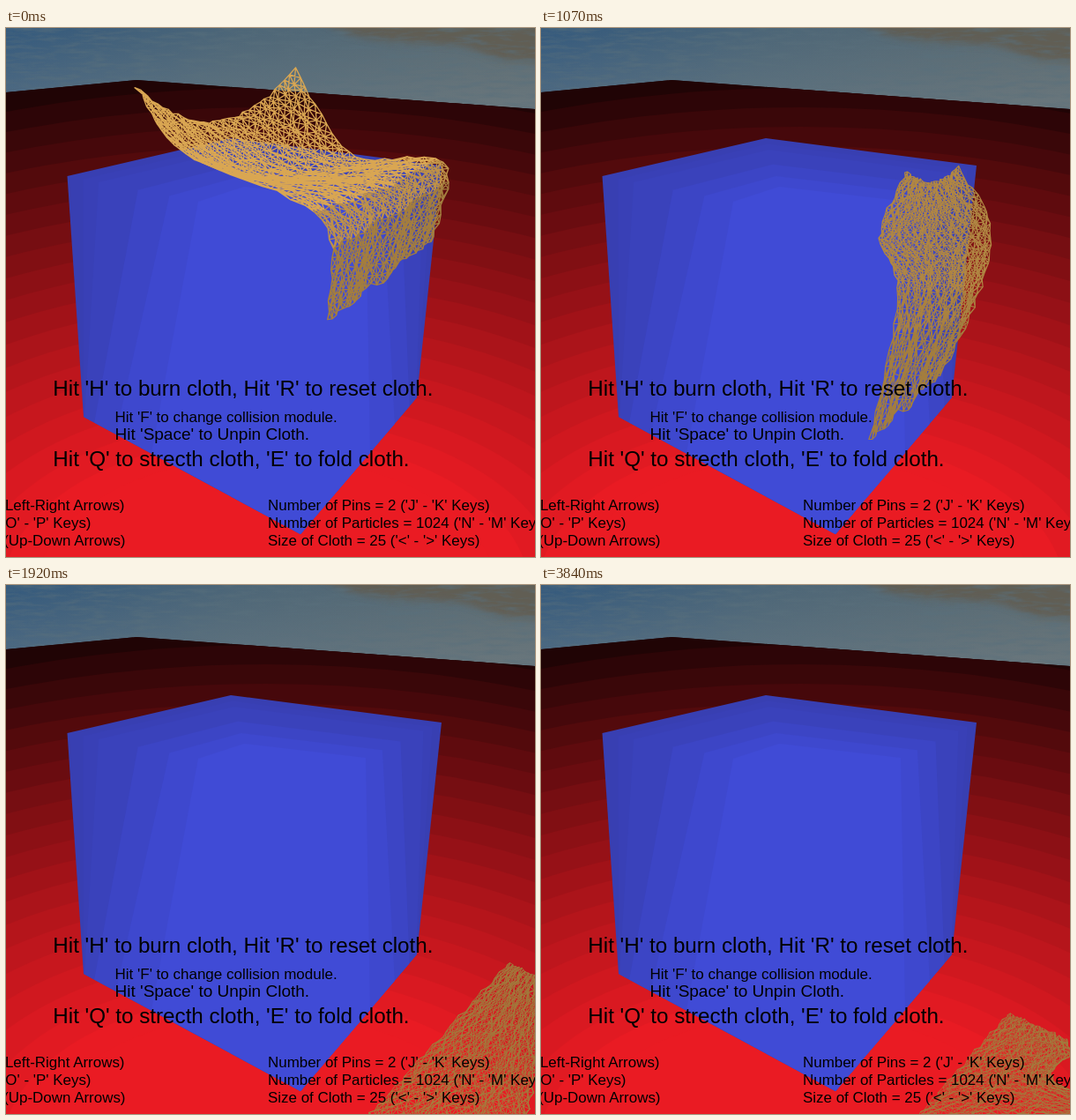
These frames come from a looping animation (600x600 px, 3920 ms). An HTML page:

```html
<!DOCTYPE html>
<html lang="en">
<head>
<meta charset="utf-8">
<title>Cloth over a box</title>
<style>
  html, body { margin: 0; width: 100%; height: 100%; overflow: hidden; background: #000; }
  svg { display: block; width: 100vw; height: 100vh; }
  text { font-family: "Liberation Sans", Arial, sans-serif; fill: #000; white-space: pre; }
</style>
</head>
<body>
<svg id="stage" viewBox="0 0 600 600">
  <defs>
    <linearGradient id="sky" x1="0" y1="0" x2="1" y2="0.12">
      <stop offset="0" stop-color="#33597d"/>
      <stop offset="0.45" stop-color="#4d6677"/>
      <stop offset="1" stop-color="#5d6c72"/>
    </linearGradient>
    <linearGradient id="haze" x1="0" y1="0" x2="0" y2="1">
      <stop offset="0" stop-color="#7d888e" stop-opacity="0"/>
      <stop offset="1" stop-color="#7d888e" stop-opacity="0.4"/>
    </linearGradient>
    <filter id="soft" x="-20%" y="-40%" width="140%" height="180%"><feGaussianBlur stdDeviation="4"/></filter>
    <filter id="grain" x="0" y="0" width="100%" height="100%">
      <feTurbulence type="fractalNoise" baseFrequency="0.035 0.2" numOctaves="5" seed="8"/>
      <feColorMatrix values="0 0 0 0 0.1  0 0 0 0 0.16  0 0 0 0 0.2  2.4 0 0 0 -1"/>
    </filter>
    <clipPath id="ground"><path d="M0 73 148 59 600 92V600H0Z"/></clipPath>
  </defs>
  <rect width="600" height="100" fill="url(#sky)"/>
  <rect width="600" height="100" fill="url(#haze)"/>
  <path d="M335-20H620V40L560 36 520 20 440 16 390 8Z" fill="#625b4f" opacity="0.85" filter="url(#soft)"/>
  <rect width="600" height="100" filter="url(#grain)" opacity="0.6"/>
  <g id="floor" clip-path="url(#ground)"></g>
  <g id="box"></g>
  <g id="cloth" fill="none" stroke-linejoin="round"></g>
  <g id="labels"></g>
</svg>
<script>
const LOOP = 3920, STEP = 76.9, N = 32, BANDS = 8;
const byId = id => document.getElementById(id);
const lerp = (a, b, p) => a + (b - a) * p;
const clamp = (x, a, b) => Math.min(b, Math.max(a, x));
const mix = (a, b, p) => a.map((x, i) => lerp(x, b[i], p));
const rgb = c => `rgb(${c.map(Math.round)})`;

function add(parent, tag, attrs, text = "") {
  const el = document.createElementNS("http://www.w3.org/2000/svg", tag);
  for (const k in attrs) el.setAttribute(k, attrs[k]);
  el.textContent = text;
  return byId(parent).appendChild(el);
}

// Floor: rings of light that brighten towards the viewer
add("floor", "rect", { width: 600, height: 600, fill: "#1e0203" });
for (let top = 46; top < 490; top += 22) {
  const q = Math.min(1, (top - 46) / 420), r = 32 + 202 * q * (1.25 - 0.25 * q), ry = 640 - top;
  add("floor", "ellipse", { cx: 295, cy: 640, rx: ry * 1.7, ry, fill: rgb([r, r * 0.115, r * 0.15]) });
}

// Box: shades nested from the silhouette to the bright middle
const boxTop = [69.5,168, 255,125, 494,156], lightTop = [218,197, 270,180, 408,196];
const boxBase = [466,419, 334,574, 88,441], lightBase = [413,482, 334,574, 165,482];
for (const p of [0, 0.12, 0.24, 0.54, 0.78, 1])
  add("box", "polygon", {
    points: [...mix(boxTop, lightTop, p), ...mix(boxBase, lightBase, p ** 3)].join(" "),
    fill: rgb(mix([56, 63, 178], [64, 75, 214], p))
  });

// Labels
const label = (x, y, size, text, anchor = "start") =>
  add("labels", "text", { x, y, "font-size": size, "text-anchor": anchor }, text);
label(53.3, 417, 24.2, "Hit 'H' to burn cloth, Hit 'R' to reset cloth.");
label(123.5, 447, 17, "Hit 'F' to change collision module.");
label(123.5, 467, 19, "Hit 'Space' to Unpin Cloth.");
label(53.3, 497, 24.2, "Hit 'Q' to strecth cloth, 'E' to fold cloth.");
["Number of Pins = 2 ('J' - 'K' Keys)",
  "Number of Particles = 1024 ('N' - 'M' Keys)",
  "Size of Cloth = 25 ('<' - '>' Keys)"].forEach((s, i) => label(297, 547 + 20 * i, 16.95, s));
label(134.5, 547, 16.95, "(Left-Right Arrows)", "end");
label(96.5, 567, 16.95, "('O' - 'P' Keys)", "end");
label(135.5, 587, 16.95, "(Up-Down Arrows)", "end");

// Cloth: a net hung between two side curves, sagging along its upper hem
let seed = 7;
const random = () => (seed = seed * 16807 % 2147483647) / 2147483647;
const jitter = Array.from({ length: N * N }, () => [random() - 0.5, random() - 0.5]);

function spline(points, t) {
  const last = points.length - 1, i = Math.min(last - 1, Math.floor(t * last)), f = t * last - i;
  const b = points[i], c = points[i + 1];
  const a = points[i - 1] || mix(c, b, 2), d = points[i + 2] || mix(b, c, 2);
  return b.map((_, k) => b[k] + f / 2 * (c[k] - a[k]
    + f * (2 * a[k] - 5 * b[k] + 4 * c[k] - d[k] + f * (3 * (b[k] - c[k]) + d[k] - a[k]))));
}

// ease > 1 slows down towards the next pose; shade is the light on upper and lower part
function pose({ left, right, sag = 0, notch = 0, rough = 4, ...look }) {
  const mesh = jitter.map(([jx, jy], i) => {
    const u = i % N / (N - 1), v = Math.floor(i / N) / (N - 1);
    const [x, y] = mix(spline(left, v), spline(right, v), u);
    const fold = Math.sin(u * 19 + v * 4) * v * Math.sin(u * Math.PI);
    const dip = sag * 4 * u * (1 - u) * (1 - v) ** 2;
    const tuck = notch * u * u * Math.sin(v * Math.PI) ** 4;
    return [x + rough * (jx + fold) - tuck, y + rough * (jy + 0.6 * fold) + dip];
  });
  return { ease: 1, ...look, mesh };
}

const poses = [
  pose({ time: 0, ease: 0.8, sag: 50, width: 1.3, shade: [1, 0.75],
    left: [[148,66], [202,142], [356,215], [366,332]],
    right: [[328,46], [392,144], [496,151], [486,238]] }),
  pose({ time: 770, ease: 0.85, sag: 28, width: 1.2, shade: [0.93, 0.76],
    left: [[287,140], [284,188], [374,216], [370,412]],
    right: [[373,113], [480,157], [500,228], [484,318]] }),
  pose({ time: 1380, width: 1, shade: [0.66, 0.74],
    left: [[572,190], [476,350], [377,537]],
    right: [[597,212], [520,358], [420,480]] }),
  pose({ time: 1920, ease: 4, width: 0.9, shade: [0.74, 0.76],
    left: [[572,427], [412,600]], right: [[625,455], [580,650]] }),
  pose({ time: 2690, width: 0.7, shade: [0.76, 0.76],
    left: [[464,560], [442,604]], right: [[520,575], [548,606]] }),
  pose({ time: 3460, notch: 34, width: 0.7, shade: [0.75, 0.75],
    left: [[521,510], [418,606]], right: [[582,545], [622,605]] }),
  pose({ time: 3840, notch: 34, width: 0.7, shade: [0.75, 0.75],
    left: [[531,486], [424,605]], right: [[596,516], [630,600]] })
];

const strips = Array.from({ length: BANDS }, () => add("cloth", "path", {}));

function draw(time) {
  const next = poses.findIndex(k => k.time > time);
  const k = next < 0 ? poses.length - 2 : next - 1;
  const a = poses[k], b = poses[k + 1];
  const p = 1 - (1 - clamp((time - a.time) / (b.time - a.time), 0, 1)) ** a.ease;
  const mesh = a.mesh.map((m, j) => mix(m, b.mesh[j], p).map(x => x.toFixed(1)).join(" "));
  const [upper, lower] = mix(a.shade, b.shade, p);
  const rows = N / BANDS;
  strips.forEach((strip, s) => {
    let d = "";
    for (let r = s * rows; r < (s + 1) * rows; r++)
      for (let c = 0; c < N; c++) {
        const c2 = Math.min(c + 1, N - 1), r2 = Math.min(r + 1, N - 1);
        const here = mesh[r * N + c], right = mesh[r * N + c2], down = mesh[r2 * N + c];
        d += `M${right}L${here} ${down}ZM${here}L${mesh[r2 * N + c2]}`;
      }
    const light = lerp(upper, lower, clamp(s / 2 - 2, 0, 1));
    strip.setAttribute("d", d);
    strip.setAttribute("stroke", rgb([217, 166, 82].map(x => x * light)));
    strip.setAttribute("stroke-width", lerp(a.width, b.width, p).toFixed(2));
  });
}

let shown = -1;
const start = performance.now();
function tick() {
  const t = (performance.now() - start) % LOOP;
  const step = Math.min(50, Math.floor((t + 7) / STEP));
  if (step !== shown) draw((shown = step) * STEP);
  requestAnimationFrame(tick);
}
tick();
</script>
</body>
</html>
```
